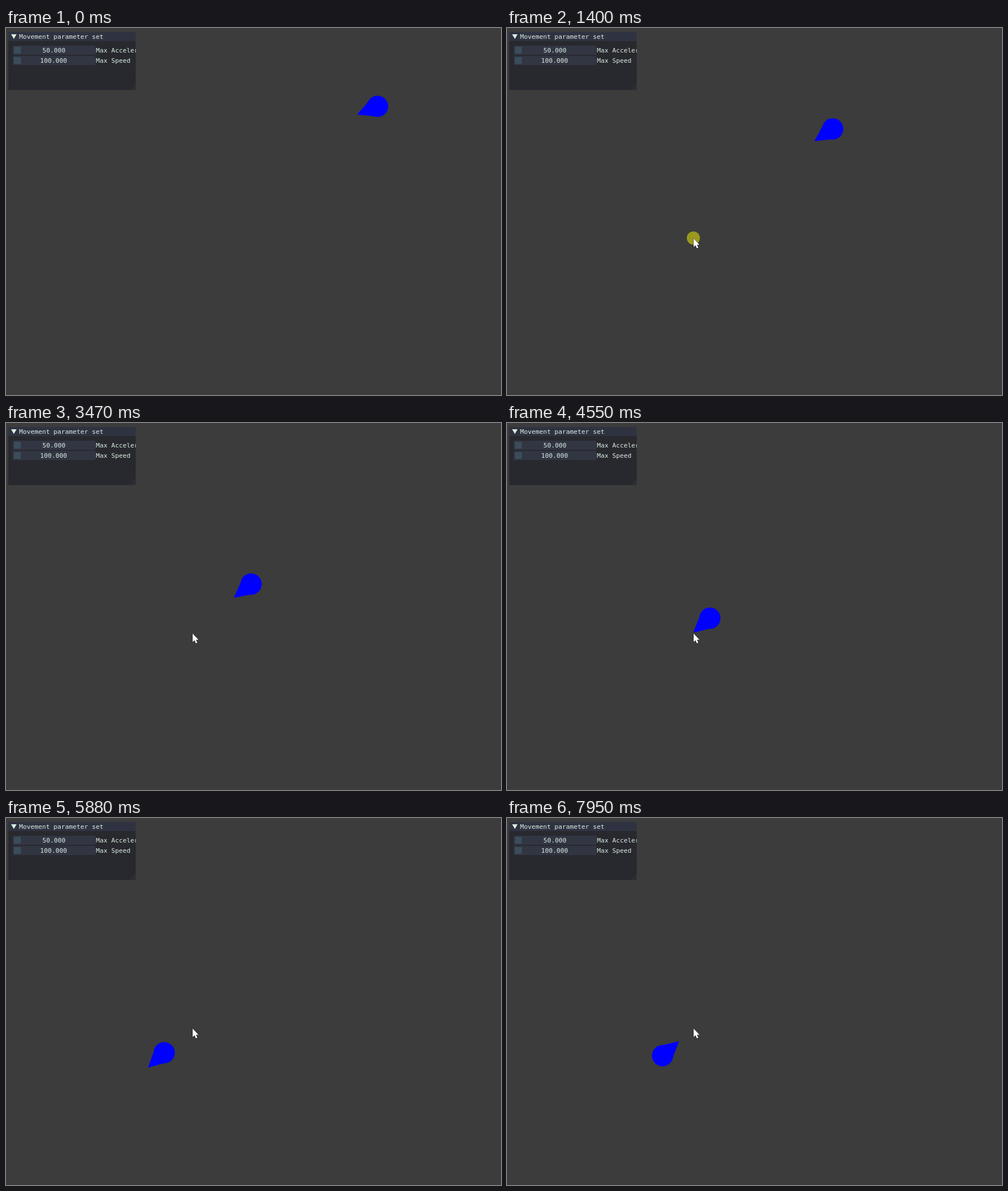
An HTML page that plays this animation: 870x644 px, repeating every 8 s.

```html
<!DOCTYPE html>
<html lang="en">
<head>
<meta charset="utf-8">
<title>Seek steering</title>
<style>
  html, body { margin: 0; width: 100%; height: 100%; overflow: hidden; background: #3c3c3c; }
  svg { display: block; width: 870px; height: 644px; }
  text { font: 11.2px "DejaVu Sans Mono", monospace; fill: #dbede3; white-space: pre; }
</style>
</head>
<body>
<svg viewBox="0 0 870 644">
  <clipPath id="panelClip"><rect x="4" y="7" width="224" height="102"/></clipPath>
  <g clip-path="url(#panelClip)">
    <rect x="4" y="7" width="224" height="102" fill="#28292e"/>
    <rect x="4" y="7" width="224" height="16" fill="#2f3341"/>
    <path d="M9 11H18.6L13.8 19.2Z" fill="#dbede3"/>
    <path d="M228 97V109H216Z" fill="#2d2e33"/>
    <g fill="#323643">
      <rect x="12" y="31" width="145" height="16"/>
      <rect x="12" y="49" width="145" height="16"/>
    </g>
    <g fill="#3b4d5a">
      <rect x="14" y="33" width="12" height="12"/>
      <rect x="14" y="51" width="12" height="12"/>
    </g>
    <text x="23" y="19">Movement parameter set</text>
    <text x="64" y="43">50.000</text>
    <text x="60" y="61">100.000</text>
    <text x="158" y="43">Max Acceleration</text>
    <text x="158" y="61">Max Speed</text>
  </g>
  <circle id="marker" cx="327.5" cy="368.5" r="11.5" fill="#9a981e"/>
  <g id="agent" fill="#00f">
    <circle r="18.7"/>
    <path d="M38.6 0L13.2 13.2V-13.2Z"/>
  </g>
  <path id="cursor" d="M0 0V14.8L3.3 11.8L5.6 17L8.2 16L5.9 10.9H10.3Z"
        fill="#fff" stroke="#111" stroke-width=".8" paint-order="stroke"/>
</svg>
<script>
const LOOP = 8000, STEP = 66.8;

// time, x, y; the outer rows only shape the end tangents
const path = [
  [-500, 680.5, 126], [0, 653, 137.5], [860, 605.3, 157.8], [1400, 572.5, 177],
  [2340, 511, 220.5], [3470, 431, 282.5], [4550, 356, 343], [5080, 319.6, 374.6],
  [5880, 278, 412], [6960, 257, 432], [7620, 263.8, 426], [7950, 273.5, 417],
  [8600, 304.6, 388.8]
];

// time, degrees below the leftward direction
const headings = [
  [0, 21.9], [430, 22.5], [860, 27], [1400, 33.7], [2340, 36.9], [3470, 38.5],
  [4550, 40.8], [5880, 42.3], [6820, 43.5], [6980, 48], [6981, 221.3], [8000, 221.3]
];

// time, cursor x, y
const pointer = [[270, 342, 402], [400, 328, 369.5], [8000, 328, 369.5]];

const byId = id => document.getElementById(id);
const agent = byId("agent"), cursor = byId("cursor"), marker = byId("marker");

function segment(rows, t) {
  let i = 0;
  while (i < rows.length - 2 && t >= rows[i + 1][0]) i++;
  return i;
}

function linear(rows, t, col) {
  const i = segment(rows, t), a = rows[i], b = rows[i + 1];
  const u = Math.min(1, Math.max(0, (t - a[0]) / (b[0] - a[0])));
  return a[col] + (b[col] - a[col]) * u;
}

function slope(rows, i, col) {
  const [a, b, c] = [rows[i - 1], rows[i], rows[i + 1]];
  const h1 = b[0] - a[0], h2 = c[0] - b[0];
  return ((b[col] - a[col]) / h1 * h2 + (c[col] - b[col]) / h2 * h1) / (h1 + h2);
}

function smooth(rows, t, col) {
  const i = Math.min(segment(rows, t), rows.length - 3);
  const a = rows[i], b = rows[i + 1], h = b[0] - a[0], u = (t - a[0]) / h;
  const v = 1 - u;
  return v * v * ((1 + 2 * u) * a[col] + u * h * slope(rows, i, col))
       + u * u * ((1 + 2 * v) * b[col] - v * h * slope(rows, i + 1, col));
}

const show = (el, on) => el.setAttribute("visibility", on ? "visible" : "hidden");

function draw(time) {
  const t = Math.floor((time + 8) / STEP) * STEP;
  const x = smooth(path, t, 1), y = smooth(path, t, 2);
  agent.setAttribute("transform",
    `translate(${x} ${y}) rotate(${180 - linear(headings, t, 1)})`);
  cursor.setAttribute("transform",
    `translate(${linear(pointer, t, 1)} ${linear(pointer, t, 2)})`);
  show(cursor, t >= 260);
  show(marker, t >= 400 && t < 1530);
}

const start = performance.now();
function tick() {
  draw((performance.now() - start) % LOOP);
  requestAnimationFrame(tick);
}
tick();
</script>
</body>
</html>
```
